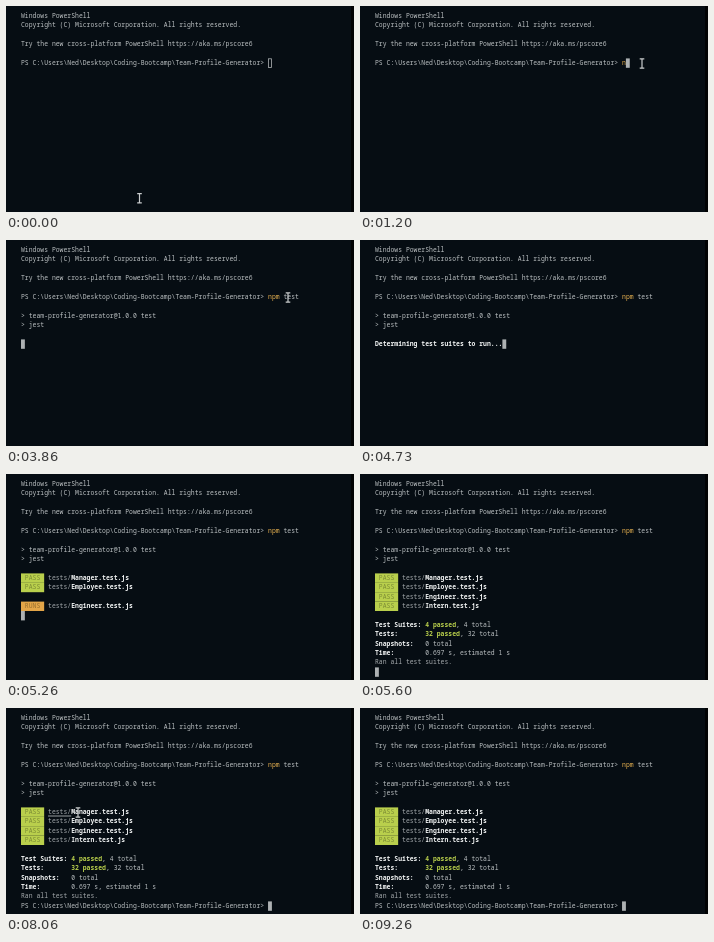
Recreate the animation shown at these times as an HTML page with a canvas. Size 348x206 px, loop 9330 ms.

```html
<!DOCTYPE html>
<html lang="en">
<head>
<meta charset="utf-8">
<title>Terminal test run</title>
<style>
  html, body { margin: 0; width: 100%; height: 100%; overflow: hidden; background: #060d13; }
  canvas { display: block; width: 348px; height: 206px; }
</style>
</head>
<body>
<canvas id="stage"></canvas>
<script>
const W = 348, H = 206, LOOP = 9330;
const LEFT = 15, TOP = 5.4, CELL = 3.86, ROW = 9.4;
const FONT_SIZE = CELL / 0.6, ZOOM = 10;
const FONT = '"Noto Sans Mono", "DejaVu Sans Mono", monospace';
const C = {
  bg: '#060d13', edge: '#010203', text: '#bcc1c3', dim: '#a4a9ac', bold: '#f2f4f4',
  yellow: '#ecb552', lime: '#b9cf4c', limeInk: '#7c8c35',
  orange: '#e2a548', orangeInk: '#98702f', block: '#adb1b3', mouse: '#c9cccd'
};
const PROMPT = 'PS C:\\Users\\Ned\\Desktop\\Coding-Bootcamp\\Team-Profile-Generator> ';
const COMMAND = 'npm test';
const KEY_TIMES = [1200, 1330, 1460, 1600, 1730, 1800, 1930, 2000];

const canvas = document.getElementById('stage');
const ctx = canvas.getContext('2d');
const dpr = window.devicePixelRatio || 1;
canvas.width = W * dpr;
canvas.height = H * dpr;

const colX = col => LEFT + col * CELL;
const rowY = row => TOP + row * ROW;

function rect(x, y, w, h, color) {
  ctx.fillStyle = color;
  ctx.fillRect(x, y, w, h);
}

// Large type scaled down keeps the advance widths exact.
function print(row, col, text, color = C.text, weight = 400) {
  ctx.save();
  ctx.translate(colX(col), rowY(row) + 6.4);
  ctx.scale(1 / ZOOM, 1 / ZOOM);
  ctx.font = `${weight} ${FONT_SIZE * ZOOM}px ${FONT}`;
  ctx.fillStyle = color;
  ctx.fillText(text, 0, 0);
  ctx.restore();
  return col + text.length;
}

function block(row, col) {
  rect(colX(col), rowY(row), CELL, ROW, C.block);
}

function hollow(row, col) {
  ctx.strokeStyle = C.block;
  ctx.lineWidth = 0.8;
  ctx.strokeRect(colX(col) + 0.4, rowY(row) + 0.4, CELL - 0.8, ROW - 0.8);
}

function suite(row, name, state = 'PASS') {
  const pass = state === 'PASS';
  rect(LEFT, rowY(row), 6 * CELL, ROW, pass ? C.lime : C.orange);
  print(row, 1, state, pass ? C.limeInk : C.orangeInk);
  print(row, 7, 'tests/', C.dim);
  print(row, 13, name + '.test.js', C.bold, 700);
}

function suites(passed, running) {
  passed.forEach((name, i) => suite(10 + i, name));
  const first = 11 + passed.length;
  running.forEach((name, i) => suite(first + i, name, 'RUNS'));
  if (running.length) block(first + running.length, 0);
}

function summaryLine(row, label, good, rest) {
  print(row, 0, label, C.bold, 700);
  const col = print(row, 13, good, C.lime, 700);
  print(row, col, rest);
}

function summary() {
  summaryLine(15, 'Test Suites:', '4 passed', ', 4 total');
  summaryLine(16, 'Tests:', '32 passed', ', 32 total');
  summaryLine(17, 'Snapshots:', '', '0 total');
  summaryLine(18, 'Time:', '', '0.697 s, estimated 1 s');
  print(19, 0, 'Ran all test suites.', C.dim);
}

function commandLine(t) {
  const typed = KEY_TIMES.filter(k => t >= k).length;
  print(5, 0, PROMPT);
  print(5, PROMPT.length, COMMAND.slice(0, Math.min(typed, 3)), C.yellow);
  print(5, PROMPT.length + 3, COMMAND.slice(3, Math.max(typed, 3)));
  if (t < 1060) hollow(5, PROMPT.length);
  else if (t < 2400) block(5, PROMPT.length + typed);
}

function testRun(t) {
  if (t < 2400) return;
  if (t < 3200) return block(6, 0);
  print(7, 0, '> team-profile-generator@1.0.0 test');
  print(8, 0, '> jest');
  if (t < 4460) return block(10, 0);
  if (t < 4930) return block(10, print(10, 0, 'Determining test suites to run...', C.bold, 700));

  const all = ['Manager', 'Employee', 'Engineer', 'Intern'];
  if (t < 5130) return suites([], all);
  if (t < 5200) return suites(all.slice(0, 1), all.slice(1));
  if (t < 5400) return suites(all.slice(0, 2), all.slice(2, 3));
  if (t < 5600) return suites(all.slice(0, 3), all.slice(3));
  suites(all, []);
  summary();
  if (t < 6060) return block(20, 0);
  block(20, print(20, 0, PROMPT));
}

// Each path is a list of [time, x, y] stops.
const PATHS = [
  [[0, 133.5, 192.2], [60, 133.5, 192.2], [600, 282, 57.5], [4530, 282, 57.5]],
  [[6730, 343, 7], [7060, 342, 159], [7260, 342, 159], [8000, 72, 104.5],
   [8200, 72, 104.5], [8600, 72, 132], [9060, 281, 197], [9130, 281, 197]]
];
const ease = u => u * u * (3 - 2 * u);

function mouseAt(t) {
  const path = PATHS.find(p => t >= p[0][0] && t < p[p.length - 1][0]);
  if (!path) return null;
  const i = path.findIndex(stop => stop[0] > t);
  const [t0, x0, y0] = path[i - 1], [t1, x1, y1] = path[i];
  const u = ease((t - t0) / (t1 - t0));
  return { x: x0 + (x1 - x0) * u, y: y0 + (y1 - y0) * u };
}

function mouse(t) {
  const p = mouseAt(t);
  if (!p) return;
  const row = Math.floor((p.y - TOP) / ROW);
  const overLink = row >= 10 && row <= 13 && p.x > colX(7) && p.x < colX(28);
  if (t > 7260 && overLink) rect(colX(7), rowY(row) + 8.2, 6 * CELL, 0.8, C.text);

  const { x, y } = p;
  ctx.strokeStyle = C.mouse;
  ctx.lineWidth = 1.2;
  ctx.beginPath();
  ctx.moveTo(x - 2.3, y - 4.6);
  ctx.lineTo(x + 2.3, y - 4.6);
  ctx.moveTo(x, y - 4.6);
  ctx.lineTo(x, y + 4.6);
  ctx.moveTo(x - 2.3, y + 4.6);
  ctx.lineTo(x + 2.3, y + 4.6);
  ctx.stroke();
}

function draw(t) {
  ctx.setTransform(dpr, 0, 0, dpr, 0, 0);
  rect(0, 0, W, H, C.bg);
  rect(345, 0, 3, H, C.edge);
  print(0, 0, 'Windows PowerShell');
  print(1, 0, 'Copyright (C) Microsoft Corporation. All rights reserved.');
  print(3, 0, 'Try the new cross-platform PowerShell https://aka.ms/pscore6');
  commandLine(t);
  testRun(t);
  mouse(t);
}

const start = performance.now();
function tick() {
  draw((performance.now() - start) % LOOP);
  requestAnimationFrame(tick);
}
tick();
</script>
</body>
</html>
```
